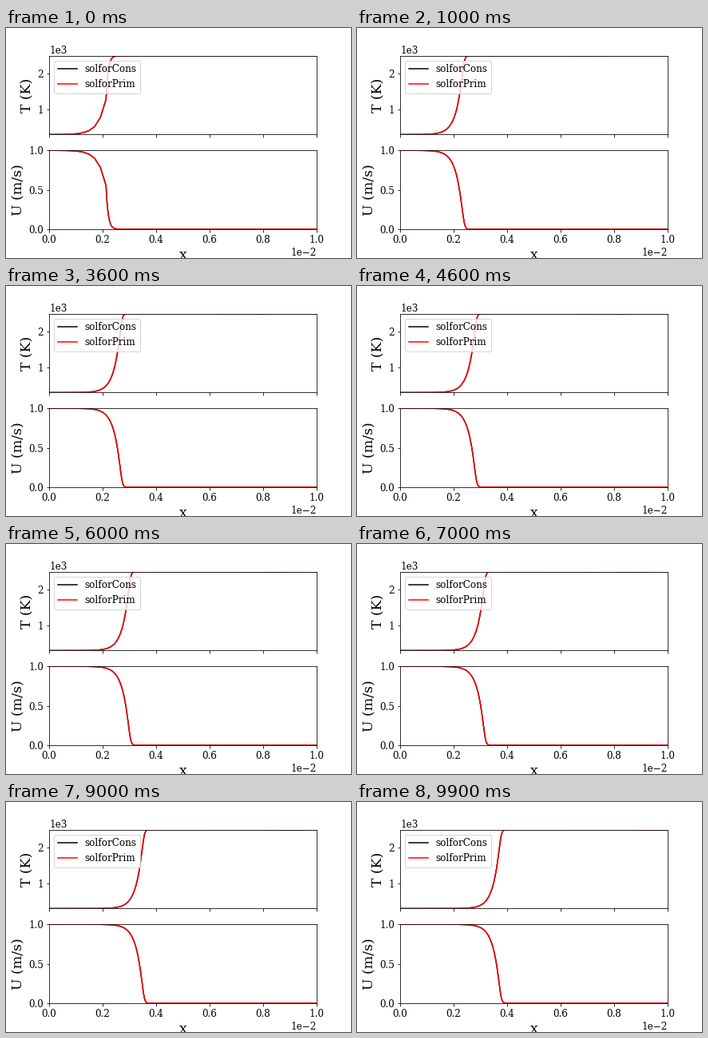
These frames come from a looping animation (432 px wide and 288 px high, 10 s). A matplotlib script:

```python
import numpy as np
import matplotlib.pyplot as plt
from matplotlib.animation import FuncAnimation

FRAMES, STEP = 100, 100
LENGTH = 0.01
T_COLD, T_HOT = 300, 2500

# Widths and positions below are fractions of the domain
THICKNESS = 0.024
SHARPNESS = 6.5
START_THICKNESS = 0.0288
START_KINK = 10 / 47
KINK_VALUE = 0.445

plt.rcParams.update({
    "font.family": "DejaVu Serif",
    "font.size": 12,
    "axes.labelsize": "x-large",
    "axes.formatter.limits": (0, 0),
    "figure.subplot.bottom": 0.125,
})

s = np.linspace(0, 1, 1675)


def front(t):
    """Steady drift that speeds up near the end."""
    return 0.2265 + 0.0126 * t + 0.0255 * (t / 9.9) ** 6


def flame(t):
    """Exponential preheat zone, softly capped at 1."""
    e = np.exp(-SHARPNESS * (s - front(t)) / THICKNESS)
    return (1 + e) ** (-1 / SHARPNESS)


def start_flame():
    """Coarse-grid preheat zone with a thin reaction layer behind it."""
    grid = np.linspace(0, START_KINK, 11)
    preheat = KINK_VALUE * np.exp((grid - START_KINK) / START_THICKNESS)
    layer = 1 - (1 - KINK_VALUE) * np.exp(-np.maximum(s - START_KINK, 0) / 0.008)
    return np.where(s < START_KINK, np.interp(s, grid, preheat), layer)


def progress(t):
    w = np.exp(-t / 0.3)
    return w * start_flame() + (1 - w) * flame(t)


def ripple(t):
    center = 0.687 + 0.0245 * t
    return 10 * min(t / 3, 1) * np.exp(-((s - center) / 0.035) ** 2)


fig, (ax_t, ax_u) = plt.subplots(2, 1, sharex=True, figsize=(6, 4), dpi=72)

curves = []
for name, color in (("solforCons", "black"), ("solforPrim", "red")):
    line_t, = ax_t.plot([], [], color=color, label=name)
    line_u, = ax_u.plot([], [], color=color)
    curves.append((line_t, line_u))

ax_t.set(ylabel="T (K)", ylim=(T_COLD, T_HOT), yticks=[1000, 2000])
ax_u.set(ylabel="U (m/s)", ylim=(0, 1), yticks=[0, 0.5, 1], xlabel="x",
         xlim=(0, LENGTH), xticks=np.linspace(0, LENGTH, 6))
ax_t.legend(loc="upper left")


def update(i):
    t = i * STEP / 1000
    c = progress(t)
    temp = T_COLD + (T_HOT - T_COLD) * c - ripple(t)
    artists = []
    for line_t, line_u in curves:
        line_t.set_data(s * LENGTH, temp)
        line_u.set_data(s * LENGTH, 1 - c)
        artists += [line_t, line_u]
    return artists


anim = FuncAnimation(fig, update, frames=FRAMES, interval=STEP,
                     repeat=True, repeat_delay=0)
plt.show()
```
